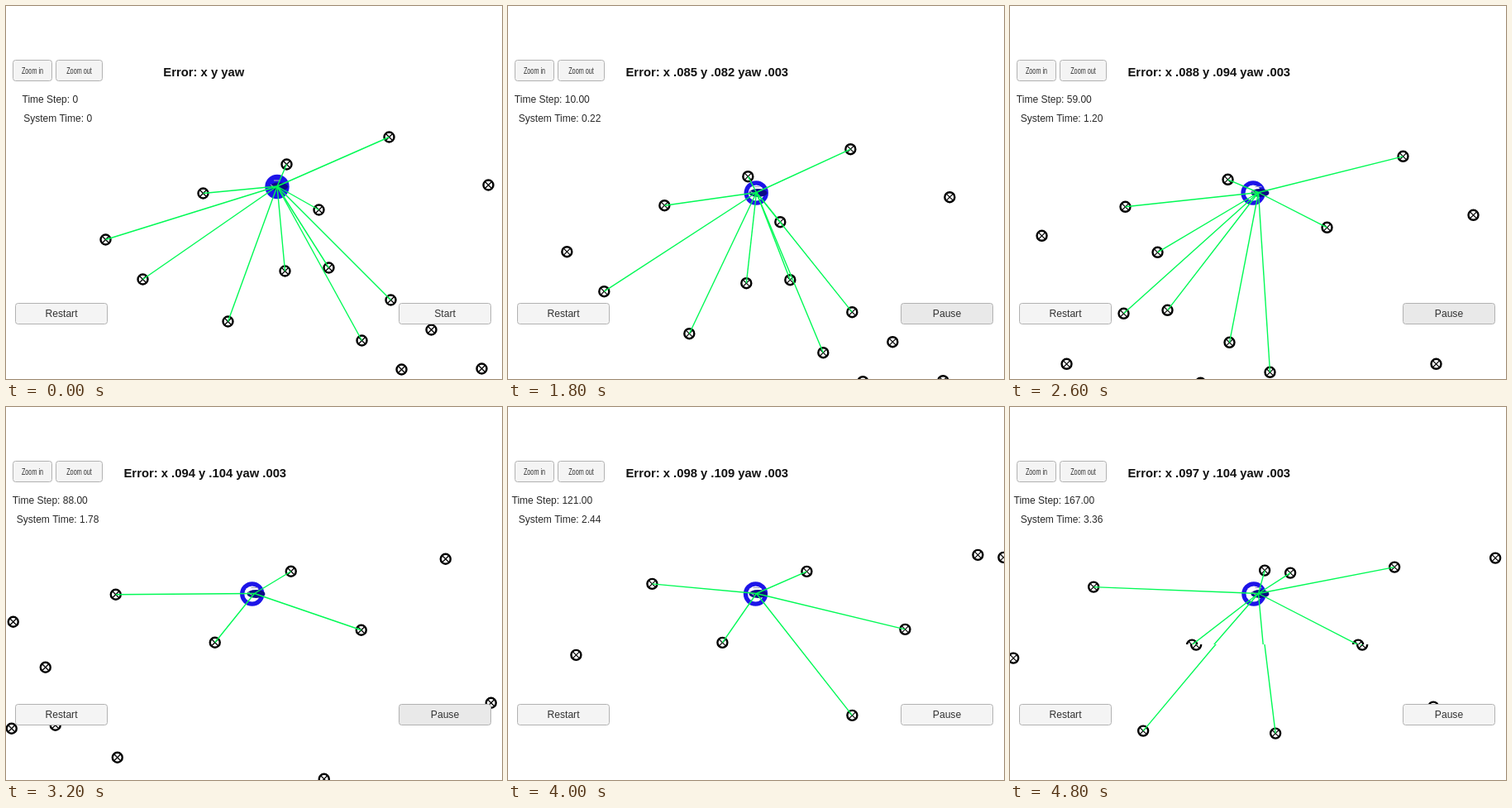
An HTML page with a canvas that plays this animation: 600x451 px, repeating every 5 s.

```html
<!DOCTYPE html>
<html lang="en">
<head>
<meta charset="utf-8">
<title>Landmark localisation</title>
<style>
  html, body { margin: 0; width: 100%; height: 100%; overflow: hidden; background: #fff; }
  canvas { display: block; }
</style>
</head>
<body>
<canvas id="stage" width="600" height="451"></canvas>
<script>
const ctx = document.getElementById("stage").getContext("2d");
const W = 600, H = 451, LOOP = 5000, TICK = 200, RUN_START = 1.8;
const RANGE = 226, GREEN = "#00fa55", BLUE = "#1d14e8", NAVY = "#0c0a86";
const SANS = '"Liberation Sans", Arial, sans-serif';

// Landmarks scattered along the route, in world pixels
const landmarks = [
  [463, 158], [339, 191], [238, 226], [378, 246], [120, 282], [165, 330], [337, 320],
  [390, 316], [268, 381], [465, 355], [430, 404], [514, 391], [583, 216], [478, 439],
  [575, 438], [675, 130], [760, 201], [715, 381], [862, 115], [981, 185], [917, 289],
  [1069, 95], [1100, 98], [1226, 91], [1182, 185], [1077, 292], [1348, 80], [1268, 260]
];

// The simulation stutters: key points of seconds and time step
const pace = [
  [1.8, 10], [2, 16], [2.2, 16], [2.4, 52], [2.6, 59], [2.8, 59], [3.4, 102],
  [3.6, 109], [3.8, 112], [4.2, 130], [4.4, 144], [4.6, 148], [4.8, 167]
];
// Time step, x error, y error
const errors = [[10, .085, .082], [59, .088, .094], [109, .098, .111], [144, .098, .104], [167, .097, .104]];

function between(keys, at) {
  const i = Math.max(1, keys.findIndex(key => key[0] >= at));
  const a = keys[i - 1], b = keys[i];
  const k = (at - a[0]) / (b[0] - a[0]);
  return a.slice(1).map((v, j) => v + (b[j + 1] - v) * k);
}

// The robot speeds up towards 6.3 px per step on a flattening climb
const travelAt = step => 6.3 * step + 356.2 * Math.exp(-step / 68) - 321.3;
const riseAt = travel => .067 * travel + 57 * (1 - Math.exp(-travel / 138)) - 5.7;
const swayAt = step => -6.5 * Math.sin(Math.PI * (step - 16) / 93) ** 2;
// A screen tear climbs into view near the end of the run
const tearAt = seconds => Math.min(H, 1439 - 240 * seconds);

function text(str, x, y, size, color = "#282828", weight = "normal") {
  ctx.font = `${weight} ${size}px ${SANS}`;
  ctx.fillStyle = color;
  ctx.textAlign = "center";
  ctx.fillText(str, x, y);
}

function line(x1, y1, x2, y2) {
  ctx.beginPath();
  ctx.moveTo(x1, y1);
  ctx.lineTo(x2, y2);
  ctx.stroke();
}

function ellipse(x, y, rx, ry, color) {
  ctx.beginPath();
  ctx.ellipse(x, y, rx, ry, 0, 0, Math.PI * 2);
  ctx.fillStyle = color;
  ctx.fill();
}

function button(label, x, y, w, h, size, squeeze = 1, fill = "#f4f4f4") {
  ctx.beginPath();
  ctx.roundRect(x + .5, y + .5, w - 1, h - 1, 3);
  ctx.fillStyle = fill;
  ctx.fill();
  ctx.strokeStyle = "#b2b2b2";
  ctx.lineWidth = 1;
  ctx.stroke();
  ctx.save();
  ctx.translate(x + w / 2, y + h / 2 + size * .37);
  ctx.scale(squeeze, 1);
  text(label, 0, 0, size, "#323232");
  ctx.restore();
}

function landmark(x, y) {
  ctx.strokeStyle = "#000";
  ctx.lineWidth = 2.4;
  ctx.beginPath();
  ctx.arc(x, y, 6, 0, Math.PI * 2);
  ctx.stroke();
  ctx.lineWidth = 1.2;
  line(x - 4, y - 4, x + 4, y + 4);
  line(x - 4, y + 4, x + 4, y - 4);
}

function robot(x, y, sway, running) {
  ellipse(x + sway, y + .5, 14.7, 14.7, BLUE);
  if (running) ellipse(x + sway, y + .5, 9.5, 9.5, "#fff");
  ellipse(x + 2, y + .5, 11, 5, NAVY);
  ctx.strokeStyle = "#a4a4c4";
  ctx.lineWidth = 1.2;
  line(x - 4, y - 7, x + 4, y - 7);
  line(x - 8, y - 2, x - 3, y + 2);
}

function world(x, y, shift, rise, sway, running, top, bottom) {
  ctx.save();
  ctx.beginPath();
  ctx.rect(0, top, W, bottom - top);
  ctx.clip();
  ctx.translate(.5, .5);
  const seen = landmarks.map(([lx, ly]) => [lx - shift, ly + rise]);
  seen.forEach(p => landmark(...p));
  robot(x, y, sway, running);
  ctx.strokeStyle = GREEN;
  ctx.lineWidth = 1.4;
  for (const [lx, ly] of seen) {
    if (Math.hypot(lx - x, ly - y) < RANGE) line(x, y, lx, ly);
  }
  ctx.restore();
}

function cursor(x, y) {
  ctx.beginPath();
  [[.5, .5], [.5, 15.5], [4, 12.3], [6.5, 18], [8.8, 17], [6.4, 11.5], [11, 11.3]]
    .forEach(([dx, dy]) => ctx.lineTo(x + dx, y + dy));
  ctx.closePath();
  ctx.fillStyle = "#fff";
  ctx.fill();
  ctx.strokeStyle = "#000";
  ctx.lineWidth = 1;
  ctx.stroke();
}

function drawCursor(seconds) {
  if (seconds < .4 || seconds >= RUN_START) return;
  if (seconds < .6) cursor(520, 436);
  else if (seconds < 1.4) cursor(531, 372);
  else if (seconds < 1.6) cursor(517, 403);
  else cursor(573, 361);
}

const decimal = v => v.toFixed(3).slice(1);

function draw(ms) {
  ctx.fillStyle = "#fff";
  ctx.fillRect(0, 0, W, H);
  const seconds = Math.floor(ms / TICK) * TICK / 1000;
  const running = seconds >= RUN_START;
  let stepLabel = "0", clock = "0", error = "Error: x y yaw";

  if (running) {
    const step = Math.round(between(pace, seconds)[0]);
    const [ex, ey] = between(errors, step);
    const travel = travelAt(step), rise = riseAt(travel), sway = swayAt(step);
    const tear = tearAt(seconds);
    world(300, 225, travel, rise, sway, true, 0, tear);
    // Below the tear the picture is one step late
    world(300, 225, travel - 5, rise, sway, true, tear, H);
    stepLabel = step.toFixed(2);
    clock = (step * .02 + .02).toFixed(2);
    error = `Error: x ${decimal(ex)} y ${decimal(ey)} yaw .003`;
  } else {
    world(327.5, 217.5, 0, 0, 0, false, 0, H);
  }

  text(error, running ? 240.8 : 239.3, 85, 14.8, "#111", "bold");
  text("Time Step: " + stepLabel, 53.3, 117.3, 12);
  text("System Time: " + clock, 62.6, 139.5, 12);
  button("Zoom in", 8, 65, 48, 26, 10.5, .69);
  button("Zoom out", 60, 65, 57, 26, 10.5, .69);
  button("Restart", 11, 359, 112, 26, 12.1);
  const hovered = running && seconds < 3.8;
  button(running ? "Pause" : "Start", 475, 359, 112, 26, 12.1, 1, hovered ? "#e9e9e9" : "#f4f4f4");
  drawCursor(seconds);
}

const start = performance.now();
function frame() {
  draw((performance.now() - start) % LOOP);
  requestAnimationFrame(frame);
}
frame();
</script>
</body>
</html>
```
